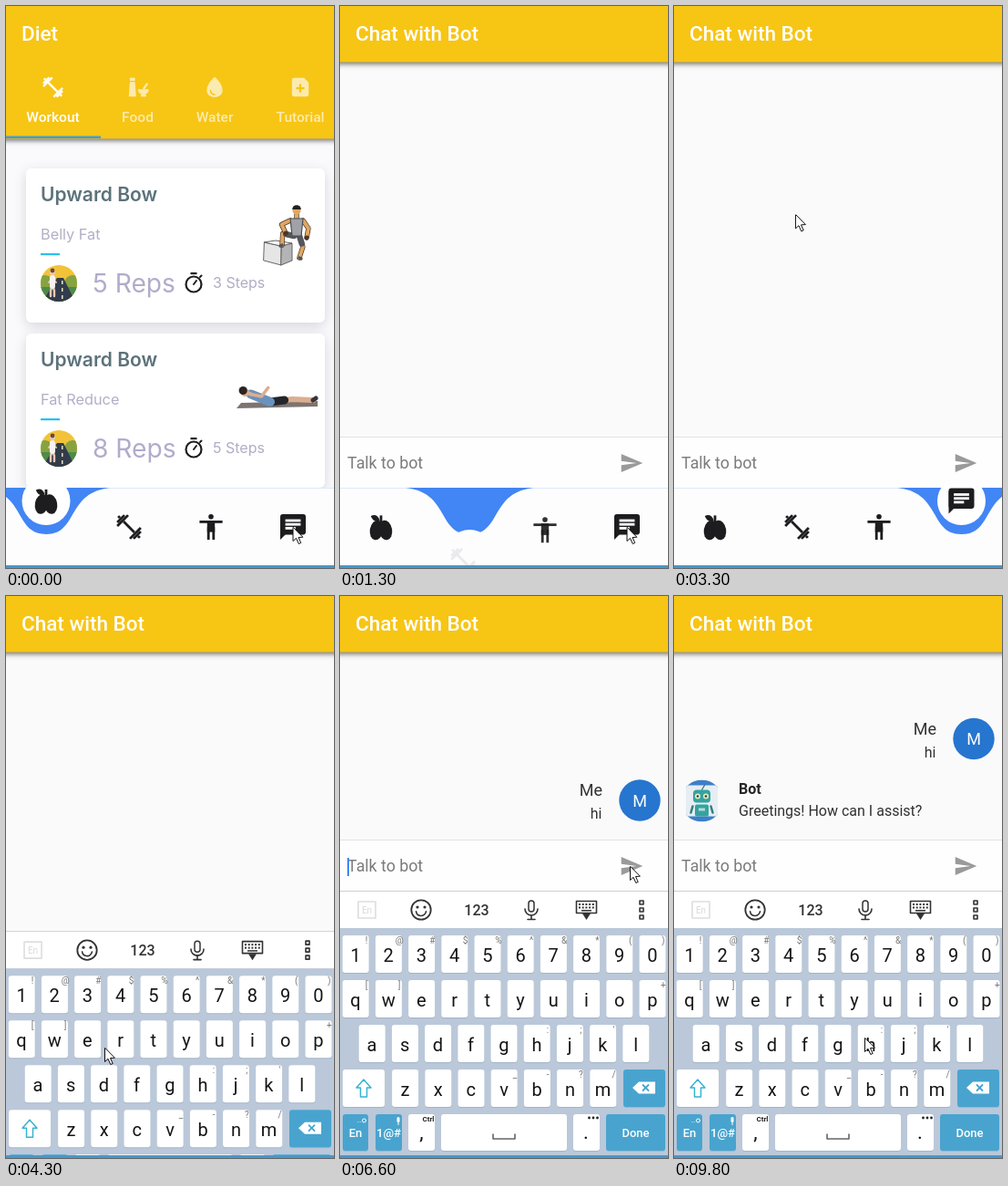
These frames come from a looping animation (360 by 616 pixels, 10000 ms). An HTML page with a canvas:

```html
<!DOCTYPE html>
<html lang="en">
<head>
<meta charset="utf-8">
<title>Diet app</title>
<style>
html, body { margin: 0; width: 100%; height: 100%; overflow: hidden; background: #fafafa; }
canvas { display: block; width: 360px; height: 616px; }
</style>
</head>
<body>
<canvas id="stage"></canvas>
<script>
const W = 360, H = 616, LOOP = 10000, NAV_Y = 528;
const canvas = document.getElementById('stage');
const g = canvas.getContext('2d');
const dpr = window.devicePixelRatio || 1;
canvas.width = W * dpr;
canvas.height = H * dpr;

const ROBOTO = 'Roboto, Arial, sans-serif';
const INTER = 'Inter, Lato, sans-serif';
const YELLOW = '#f7c514', INK = '#1d1d1f', BLUE = '#4285f4', KEY_BLUE = '#48a4cf';

// Moments of the story, in ms
const SWITCH = 1150, KEYS_IN = 4150, RESIZE = 4450, TYPE_H = 5150, TYPE_I = 5500, SEND = 6300, REPLY = 8900;

const clamp = v => Math.max(0, Math.min(1, v));
const lerp = (a, b, p) => a + (b - a) * p;
const mix = (a, b, p) => [lerp(a[0], b[0], p), lerp(a[1], b[1], p)];
const smooth = p => p * p * (3 - 2 * p);

function text(s, x, y, font, color, align = 'left') {
  g.font = font;
  g.fillStyle = color;
  g.textAlign = align;
  g.fillText(s, x, y);
}
function rect(x, y, w, h, color) {
  g.fillStyle = color;
  g.fillRect(x, y, w, h);
}
function round(x, y, w, h, r, color) {
  g.fillStyle = color;
  g.beginPath();
  g.roundRect(x, y, w, h, r);
  g.fill();
}
function disc(x, y, r, color, from = 0, to = 7) {
  g.fillStyle = color;
  g.beginPath();
  g.arc(x, y, r, from, to);
  g.fill();
}
function ring(x, y, r, width, color, from = 0, to = 7) {
  g.strokeStyle = color;
  g.lineWidth = width;
  g.beginPath();
  g.arc(x, y, r, from, to);
  g.stroke();
}
function poly(points, color, edge, width = 1) {
  g.beginPath();
  points.forEach(p => g.lineTo(p[0], p[1]));
  g.closePath();
  if (color) { g.fillStyle = color; g.fill(); }
  if (edge) { g.strokeStyle = edge; g.lineWidth = width; g.stroke(); }
}
function line(points, width, color) {
  g.strokeStyle = color;
  g.lineWidth = width;
  g.lineCap = g.lineJoin = 'round';
  g.beginPath();
  points.forEach(p => g.lineTo(p[0], p[1]));
  g.stroke();
}
function inCircle(x, y, r, paint) {
  g.save();
  g.beginPath();
  g.arc(x, y, r, 0, 7);
  g.clip();
  paint();
  g.restore();
}
function shadowed(blur, dy, color, paint) {
  g.save();
  g.shadowBlur = blur * dpr;
  g.shadowOffsetY = dy * dpr;
  g.shadowColor = color;
  paint();
  g.restore();
}

// Icons are drawn around 0,0 in a box of 24 units
const ICON = {
  dumbbell(c) {
    g.rotate(Math.PI / 4);
    rect(-6, -1, 12, 2, c);
    [6, 4, 1].forEach((half, i) => {
      for (const x of [6 + 2 * i, -8 - 2 * i]) rect(x, -half, 2, 2 * half, c);
    });
  },
  chat(c, paper) {
    round(-10, -10, 20, 16, 2, c);
    poly([[-10, -8], [-10, 10], [-5, 5]], c);
    for (let i = 0; i < 3; i++) rect(-6, -6 + 3 * i, i < 2 ? 12 : 8, 2, paper);
  },
  person(c) {
    disc(0, -8, 2, c);
    rect(-9, -5, 18, 2, c);
    rect(-3, -5, 6, 9, c);
    for (const x of [-3, 1]) rect(x, 0, 2, 10, c);
  },
  apple(c) {
    for (const x of [-3.5, 3.5]) {
      g.fillStyle = c;
      g.beginPath();
      g.ellipse(x, 2.5, 5.2, 7.8, -x * .05, 0, 7);
      g.fill();
    }
    rect(-1, -9, 2, 6, c);
    g.beginPath();
    g.moveTo(-8, -8.5);
    g.quadraticCurveTo(-3, -11, -1, -5);
    g.quadraticCurveTo(-6, -3, -8, -8.5);
    g.fill();
  },
  food(c) {
    rect(-7.5, -9, 5, 3, c);
    poly([[-7.5, -5], [-2.5, -5], [-1.5, 9], [-8.5, 9]], c);
    disc(5.5, 2, 5.2, c, 0, Math.PI);
    rect(3, 7, 5, 2, c);
    line([[6, 1], [9, -3]], 2, c);
  },
  drop(c) {
    g.fillStyle = c;
    g.beginPath();
    g.moveTo(0, -10);
    g.bezierCurveTo(10, -1, 10, 9, 0, 9.5);
    g.bezierCurveTo(-10, 9, -10, -1, 0, -10);
    g.fill();
    ring(0, 3, 4, 1.2, YELLOW, Math.PI / 2, Math.PI);
  },
  note(c) {
    round(-8, -9, 16, 18, 2, c);
    poly([[3, -9.5], [8.5, -9.5], [8.5, -4]], YELLOW);
    rect(-4, 0, 8, 2, YELLOW);
    rect(-1, -3, 2, 8, YELLOW);
  },
  send(c) {
    poly([[-10.5, -9], [10.5, 0], [-10.5, 9], [-10.5, 2], [4.5, 0], [-10.5, -2]], c);
  }
};
function icon(name, x, y, scale, color, paper = '#fff') {
  g.save();
  g.translate(x, y);
  g.scale(scale, scale);
  ICON[name](color, paper);
  g.restore();
}

function header(h, title) {
  shadowed(5, 2, 'rgba(0,0,0,.5)', () => rect(-8, -8, W + 16, h + 8, YELLOW));
  text(title, 17, 38, `500 22.5px ${ROBOTO}`, '#fff');
}

// Middle joint of a limb whose two bones are equally long; bend is -1 to 1
function limb(a, b, bone, bend) {
  const dx = b[0] - a[0], dy = b[1] - a[1], d = Math.hypot(dx, dy);
  const out = bend * Math.sqrt(Math.max(0, bone * bone - d * d / 4)) / d;
  return [a, [(a[0] + b[0]) / 2 - dy * out, (a[1] + b[1]) / 2 + dx * out], b];
}

function crate() {
  poly([[283, 259], [302, 263], [302, 284], [283, 279]], '#e6e6e6', '#666');
  poly([[302, 263], [314, 260], [314, 279], [302, 284]], '#b4b4b6', '#666');
  poly([[283, 259], [296, 257], [314, 260], [302, 263]], '#f4f4f4', '#666');
}

function jumper(p) {
  crate();
  const skin = '#e0a763', edge = '#4a3527';
  const [x, y] = mix([319, 224], [287, 192], p);
  const outlined = (pts, w) => { line(pts, w + 1.4, edge); line(pts, w, skin); };
  for (const s of [1, -1]) {
    const left = s < 0;
    const foot = mix(left ? [303, 262] : [322, 276], left ? [280, 243] : [296, 243], p);
    const leg = limb([x + 3 * s, y + 28], foot, 12.6, -s);
    outlined(leg, 4);
    line([leg[0], mix(leg[0], leg[1], .7)], 6.5, '#55565c');
    line([foot, [foot[0] + 2 * s, foot[1] + 1]], 3.4, '#55565a');
    const hand = mix(left ? [307, 249] : [330, 254], [x + 19 * s, y + 10], p);
    outlined(limb([x + 7 * s, y + 11], hand, 10.5, s * (2 * p - 1)), 4);
    disc(hand[0], hand[1], 2.4, edge);
  }
  outlined([[x, y], [x, y + 9]], 4);
  poly([[x - 7, y + 9], [x + 7, y + 9], [x + 5, y + 28], [x - 5, y + 28]], '#a0a2a7', '#4c4d51', 1.2);
  disc(x, y, 4.6, skin);
  disc(x, y - 1, 4.8, '#25201f', Math.PI, 0);
}

function sitter(p) {
  const skin = '#dcae90', angle = Math.PI + lerp(.38, 1.07, p);
  const hip = [290, 434], foot = mix([337, 432], [333, 434], p);
  const along = r => [hip[0] + r * Math.cos(angle), hip[1] + r * Math.sin(angle)];
  const knee = [314, lerp(431, 420, p)], shoulder = along(23), head = along(31);
  const hand = [shoulder[0] + 19, shoulder[1] - 7];
  poly([[258, 435], [342, 433], [342, 439], [253, 441]], '#7b7470');
  line([hip, knee, foot], 6, skin);
  line([hip, mix(hip, knee, .65)], 9, '#25262b');
  line([foot, [foot[0] + 3, foot[1] - 2]], 5, '#37343a');
  line([shoulder, hip], 10, '#6a92bd');
  line([head, shoulder], 4, skin);
  line(limb(shoulder, hand, 12, 1), 3.6, skin);
  disc(head[0] + 1, head[1] + 1, 4.6, skin);
  disc(head[0] - 1, head[1] - 1, 4.6, '#2b2422');
}

function runner(x, y, t) {
  inCircle(x, y, 20, () => {
    rect(x - 20, y - 20, 40, 40, '#f2c338');
    for (const s of [-1, 1]) disc(x + 15 * s, y, 9, '#87a341');
    rect(x - 20, y + 4, 40, 20, '#4f8a4a');
    poly([[x - 2, y - 6], [x + 5, y - 6], [x + 18, y + 20], [x - 18, y + 20]], '#323c4d');
    for (let i = 0; i < 3; i++) rect(x + 3, y - 3 + i * 8, 1.5, 4, '#e9e3bc');
    const cx = x - 7, swing = 2 * Math.cos(t / 450 * Math.PI);
    for (const s of [-swing, swing]) {
      line([[cx, y + 2], [cx + s, y + 8], [cx + s, y + 14]], 2.4, '#ecc9b2');
      line([[cx, y - 6], [cx + 2 * s, y - 1]], 2, '#ecc9b2');
    }
    line([[cx, y - 6], [cx, y + 3]], 6, '#f6f2f0');
    disc(cx, y - 12, 3, '#ecc9b2');
    disc(cx, y - 14, 2.4, '#6b4a37');
  });
}

function stopwatch(x, y) {
  ring(x, y + 1, 8.5, 2.2, INK);
  rect(x - 3.5, y - 12, 7, 2.2, INK);
  line([[x, y + 1], [x + 3, y - 3]], 2, INK);
  line([[x + 7, y - 7], [x + 8.5, y - 8.5]], 2, INK);
}

function card(y, note, reps, steps, t) {
  shadowed(13, 4, 'rgba(70,75,100,.2)', () => round(22, y, 328, 169, 6, '#fff'));
  text('Upward Bow', 38, y + 36, `600 21px ${INTER}`, '#5c727b');
  text(note, 38, y + 78, `400 16.3px ${INTER}`, '#b2afc6');
  rect(38, y + 93, 21, 2.2, '#2bc0ea');
  runner(58, y + 126, t);
  text(`${reps} Reps`, 95, y + 136, `400 28.2px ${INTER}`, '#b0accb');
  stopwatch(206, y + 126);
  text(`${steps} Steps`, 227, y + 131, `400 16px ${INTER}`, '#b0adc6');
}

function workoutPage(t) {
  rect(0, 0, W, H, '#fafafc');
  card(178, 'Belly Fat', 5, 3, t);
  card(359, 'Fat Reduce', 8, 5, t);
  const p = smooth(clamp(t / 900));
  jumper(p);
  sitter(p);
  header(145.5, 'Diet');
  const tabs = [['Workout', 51.5, 'dumbbell'], ['Food', 144.5, 'food'], ['Water', 229, 'drop'], ['Tutorial', 323, 'note']];
  tabs.forEach(([label, x, name], i) => {
    const color = i ? '#fcebae' : '#fff';
    icon(name, x, 89, 1.15, color);
    text(label, x, 126.5, `500 15.5px ${ROBOTO}`, color, 'center');
  });
  rect(0, 142.5, 104, 2.5, '#3d9fd6');
}

function message(y) {
  text('Me', 288, y - 5, `18px ${ROBOTO}`, '#303030', 'right');
  text('hi', 287.5, y + 20, `16px ${ROBOTO}`, '#303030', 'right');
  disc(329, y, 22.7, '#2675cf');
  text('M', 329, y + 6.5, `18px ${ROBOTO}`, '#fff', 'center');
}

function botReply() {
  const x = 30.5, y = 224.5, teal = '#35a3a0';
  inCircle(x, y, 23, () => {
    rect(x - 17.5, y - 23, 35, 46, '#3d7fc9');
    rect(x - 17.5, y - 17, 35, 34, '#e6eef3');
  });
  line([[x, y - 12], [x + 3, y - 17]], 1.2, '#3a6d74');
  round(x - 9.5, y - 12, 19, 14, 4, teal);
  round(x - 7.5, y + 4, 15, 13, 2, teal);
  rect(x - 3.5, y + 8, 7, 3, '#b9dcd5');
  for (const s of [-1, 1]) {
    line([[x + 10 * s, y + 6], [x + 12 * s, y + 13]], 2.5, '#347f80');
    disc(x + 4.5 * s, y - 5, 3, '#e7ecc0');
    disc(x + 4.5 * s, y - 5, 1.3, '#24464b');
  }
  text('Bot', 71, 217, `700 16px ${ROBOTO}`, '#262626');
  text('Greetings! How can I assist?', 71, 241, `16px ${ROBOTO}`, '#303030');
}

function typed(t) {
  return t < TYPE_H || t >= SEND ? '' : t < TYPE_I ? 'h' : 'hi';
}

function chatPage(t) {
  rect(0, 0, W, H, '#fafafa');
  header(61.5, 'Chat with Bot');
  if (t >= SEND) message(t < REPLY ? 224 : 156.5);
  if (t >= REPLY) botReply();
  const y = t < RESIZE ? 472 : 267, word = typed(t);
  rect(0, y, W, 57, '#fefefe');
  rect(0, y, W, 1, '#e3e3e3');
  text(word || 'Talk to bot', 8, y + 35, `17.8px ${ROBOTO}`, word ? '#333' : '#7b7b7b');
  const end = word ? g.measureText(word).width : 0;
  rect(8, y + 37, end, 1, '#333');
  const since = t - (t < SEND ? RESIZE : SEND);
  if (since >= 0 && Math.floor(since / 500) % 2 === 0) rect(8 + end, y + 20, 2, 20, BLUE);
  icon('send', 320.5, y + 29, 1.12, word ? '#3091e8' : '#9a9a9a');
}

function navBar(t) {
  const p = 1 - Math.pow(1 - clamp((t - SWITCH) / 650), 1.7);
  const x = lerp(44, 315.5, p);
  const y = 542.5 + 80 * (1 - Math.abs(1 - 2 * p));
  const names = ['apple', 'dumbbell', 'person', 'chat'];
  rect(0, NAV_Y, W, H - NAV_Y, BLUE);
  g.save();
  g.beginPath();
  g.rect(0, NAV_Y - 3, W, H - NAV_Y + 3);
  g.clip();
  disc(x, y, 26.5, '#fff');
  icon(p < .5 ? 'apple' : 'chat', x, y, 1.4, INK);
  g.restore();
  const dip = NAV_Y + 51, top = NAV_Y + 4;
  g.fillStyle = '#fdfdfe';
  g.beginPath();
  g.moveTo(-80, NAV_Y);
  g.lineTo(x - 72, NAV_Y);
  g.bezierCurveTo(x - 21.6, top, x - 36, dip, x, dip);
  g.bezierCurveTo(x + 36, dip, x + 21.6, top, x + 72, NAV_Y);
  g.lineTo(W + 80, NAV_Y);
  g.lineTo(W + 80, H);
  g.lineTo(-80, H);
  g.fill();
  rect(0, NAV_Y, Math.max(0, x - 70), 1, '#dfe8f7');
  rect(x + 70, NAV_Y, Math.max(0, W - x - 70), 1, '#dfe8f7');
  names.forEach((name, i) => {
    const home = 45 + 90 * i;
    const d = Math.min(1, Math.abs(x - home) / 90);
    if (d < .02) return;
    g.globalAlpha = d;
    icon(name, home, 571 + (1 - d) * 40, 1.4, INK);
    g.globalAlpha = 1;
  });
}

function suggestions(word) {
  const list = word === 'h' ? ['h', 'how', 'his', 'hi', 'hit', 'high'] : ['hi', 'his', 'hit', 'high', 'him'];
  let x = 0;
  g.save();
  g.beginPath();
  g.rect(0, 323, 309, 42);
  g.clip();
  list.forEach((w, i) => {
    const font = `${i ? 400 : 700} 22px ${ROBOTO}`;
    g.font = font;
    const cell = Math.max(54, g.measureText(w).width + 18);
    rect(x, 324, i ? 1 : cell, 40, i ? '#d0d0d0' : '#1cb9dc');
    text(w, x + cell / 2, 352, font, i ? '#111' : '#fff', 'center');
    x += cell;
  });
  g.restore();
  const fade = g.createLinearGradient(292, 0, 312, 0);
  fade.addColorStop(0, 'rgba(255,255,255,0)');
  fade.addColorStop(1, '#fff');
  rect(292, 325, 20, 38, fade);
  disc(335, 344, 15.7, '#737373');
  poly([[328, 339.5], [342, 339.5], [335, 350]], '#fff');
}

function toolbar() {
  const c = '#333', y = 344;
  const box = (x, top, w, h, color) => {
    g.strokeStyle = color;
    g.lineWidth = 1.6;
    g.strokeRect(x, top, w, h);
  };
  box(20, y - 9, 19, 18, '#dedede');
  text('En', 29.5, y + 4, `10px ${ROBOTO}`, '#dadada', 'center');
  ring(89, y, 10.7, 1.8, c);
  for (const s of [-4, 4]) disc(89 + s, y - 3, 1.6, c);
  ring(89, y + 1, 5.5, 1.6, c, .15, 3);
  text('123', 150, y + 5.5, `500 16px ${ROBOTO}`, c, 'center');
  line([[210, y - 7], [210, y - 1]], 7.5, c);
  line([[210, y - 7], [210, y - 1]], 4.5, '#fff');
  ring(210, y - 1, 7, 1.6, c, 0, Math.PI);
  line([[210, y + 6], [210, y + 10]], 1.6, c);
  line([[206, y + 10.5], [214, y + 10.5]], 1.6, c);
  box(259.5, y - 9.5, 22, 13, c);
  for (let i = 0; i < 10; i++) rect(262 + i % 5 * 3.7, y - 7 + 3.5 * Math.floor(i / 5), 2, 2, c);
  rect(265, y, 11, 1.5, c);
  poly([[266, y + 4], [275, y + 4], [270.5, y + 11]], c);
  for (let i = -1; i < 2; i++) box(329, y - 2 + 8 * i, 4, 4, c);
}

const KEY_TOP = 372, KEY_STEP = 36.2, ROW_STEP = 49;
const rowY = row => KEY_TOP + ROW_STEP * row;

function key(x, row, w, color = '#fff', label = '') {
  const y = rowY(row), h = row < 4 ? 41 : 40;
  round(x, y + 1, w, h, 3, '#a3b4c7');
  round(x, y, w, h, 3, color);
  text(label, x + w / 2, y + 25, `500 13px ${ROBOTO}`, '#fff', 'center');
}

function keyRow(row, chars, hints, x) {
  [...chars].forEach((c, i) => {
    const mid = x + KEY_STEP * i, y = rowY(row);
    key(mid - 14.3, row, 29);
    text(c, mid, y + 28.5, `20px ${ROBOTO}`, '#151515', 'center');
    text(hints[i] || '', mid + 12, y + 9, `10px ${ROBOTO}`, '#777', 'center');
  });
}

function keyboard(t) {
  g.save();
  g.translate(0, 293 * (1 - smooth(clamp((t - KEYS_IN) / 200))));
  rect(0, 323, W, 41, '#fff');
  rect(0, 323, W, 1, '#cfcfcf');
  rect(0, 364, W, 252, '#bac8d9');
  const word = typed(t);
  if (word) suggestions(word); else toolbar();

  keyRow(0, '1234567890', '!@#$%^&*()', 17);
  keyRow(1, 'qwertyuiop', '[]       +', 17);
  keyRow(2, 'asdfghjkl', "     :;' ", 35);
  keyRow(3, 'zxcvbnm', '   _-?/', 71.4);

  key(3, 3, 46);
  const half = [[0, 530], [8, 539], [3.5, 539], [3.5, 549]];
  const mirrored = half.map(([x, y]) => [-x, y]).reverse();
  poly([...half, ...mirrored].map(([x, y]) => [26 + x, y]), null, '#38b3d2', 1.5);
  key(311, 3, 46, KEY_BLUE);
  poly([[321, 539], [328, 532.5], [346, 532.5], [346, 545.5], [328, 545.5]], '#fff');
  for (const s of [-3, 3]) line([[335.5 - s, 536], [335.5 + s, 542]], 1.8, KEY_BLUE);

  key(3, 4, 28, KEY_BLUE, 'En');
  text('..', 21, 577, `9px ${ROBOTO}`, '#fff', 'center');
  ring(26.5, 575, 2, 1, '#fff');
  key(39, 4, 29, KEY_BLUE, '1@#');
  round(62.5, 571, 3, 6, 1.5, '#fff');
  rect(63.5, 577, 1, 3, '#fff');
  key(75, 4, 29);
  text(',', 89.5, 595, `22px ${ROBOTO}`, '#111', 'center');
  text('Ctrl', 97, 576, `700 8px ${ROBOTO}`, '#222', 'center');
  key(111, 4, 138);
  line([[168, 590], [168, 595], [192, 595], [192, 590]], 1.6, '#666');
  key(256, 4, 29);
  text('.', 270, 595, `22px ${ROBOTO}`, '#111', 'center');
  for (let i = 0; i < 3; i++) disc(273.5 + i * 4.5, 572, 1.4, '#222');
  key(292, 4, 65, KEY_BLUE, 'Done');
  g.restore();
}

// Each move: when it leaves, when it arrives, where it ends
const MOVES = [
  [2150, 2300, [326, 566]], [2450, 3300, [133, 228]], [3300, 4000, [108, 495]],
  [4500, 5050, [213, 487]], [TYPE_H, 5300, [270, 432]], [5550, 6100, [318, 296]],
  [7350, 8000, [209, 404]], [8000, 8700, [209, 484]]
];

function pointer(t) {
  const at = MOVES.reduce((from, [leave, arrive, to]) => mix(from, to, clamp((t - leave) / (arrive - leave))), [314.5, 571]);
  g.save();
  g.translate(at[0], at[1]);
  g.lineJoin = 'miter';
  poly([[.5, .5], [.5, 15.5], [4, 12.3], [6.8, 18.5], [9.2, 17.5], [6.5, 11.5], [11, 11.2]], '#fff', '#111');
  g.restore();
}

function draw(t) {
  g.setTransform(dpr, 0, 0, dpr, 0, 0);
  if (t < SWITCH + 50) workoutPage(t); else chatPage(t);
  if (t < RESIZE) navBar(t);
  if (t >= KEYS_IN) keyboard(t);
  rect(0, 613, W, 3, '#4797cc');
  pointer(t);
}

const start = performance.now();
function tick() {
  draw((performance.now() - start) % LOOP);
  requestAnimationFrame(tick);
}
tick();
</script>
</body>
</html>
```
